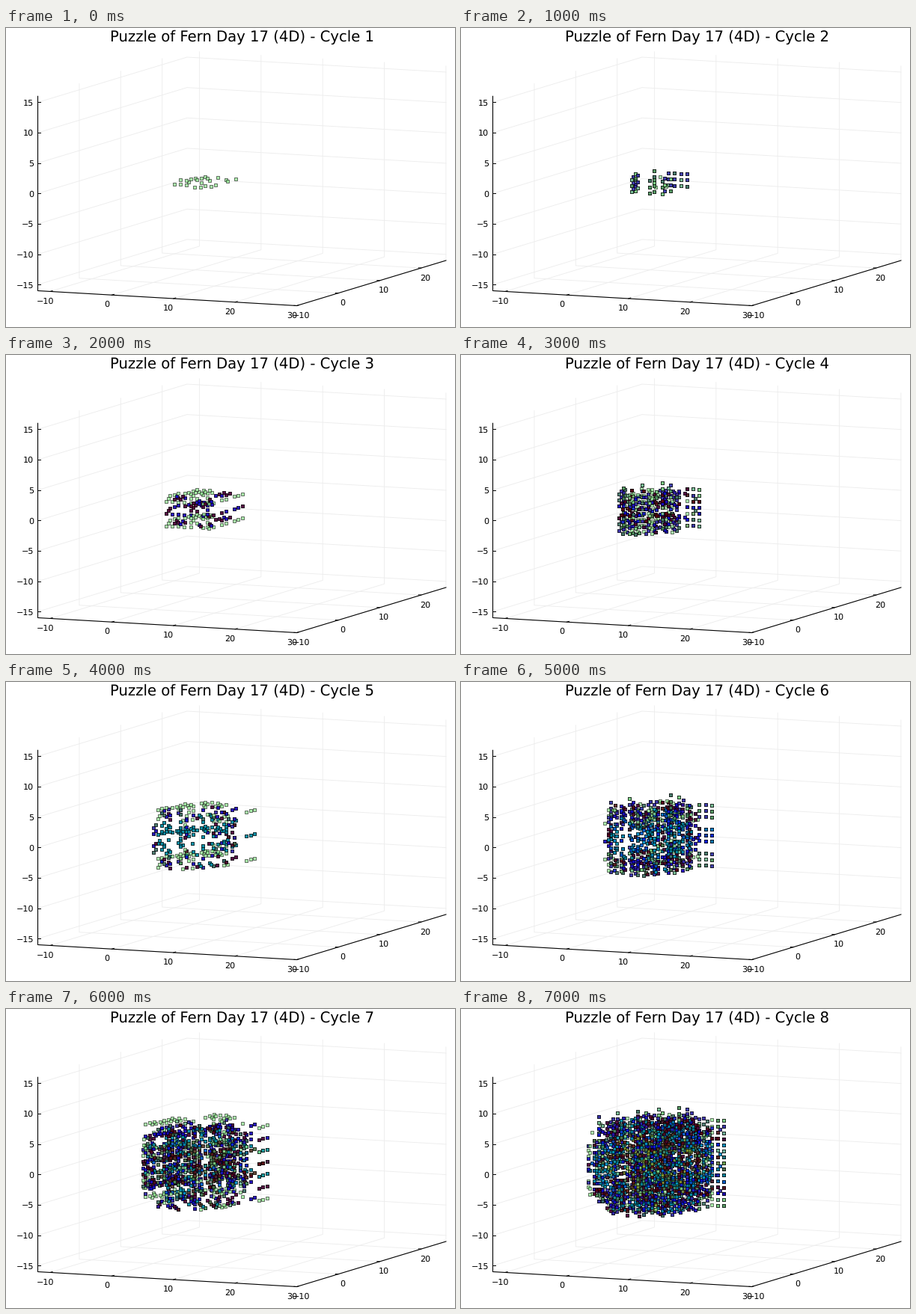
Write a matplotlib script that moves like this. It is 600 by 400 pixels and loops after 8000 ms.

```python
import numpy as np
import matplotlib.pyplot as plt
from matplotlib.animation import FuncAnimation

plt.rcParams["text.hinting"] = "none"

W, H, DPI = 600, 400, 100
PX = 72 / DPI  # points per pixel
FRAMES = 8
X0, X1, Y0, Y1, Z0, Z1 = -12, 30, -10, 26, -16, 16

# Live columns of each starting row, keyed by y
START = {1: (6, 7), 2: (2, 3, 4, 7, 8), 3: (8,), 4: (3, 5), 5: (1, 2),
         6: (2, 3, 5, 8), 7: (2, 3, 4, 7), 8: (3, 5, 8)}
OFFSET = np.array([7, 7, 8, 8])
SHAPE = (24, 24, 17, 17)

BLUE, VIOLET, AZURE = (8, 8, 235), (45, 15, 190), (0, 80, 215)
TEAL, CYAN = (0, 140, 165), (0, 155, 195)
MAROON, BROWN = (95, 0, 12), (95, 40, 35)
MINT, GREEN, OLIVE = (144, 238, 144), (75, 145, 85), (145, 175, 45)
# One colour for each fourth coordinate, -7 to 7
PALETTE = np.array([MAROON, GREEN, AZURE, TEAL, MAROON, BLUE, VIOLET, MINT,
                    GREEN, MAROON, BLUE, TEAL, CYAN, BROWN, OLIVE]) / 255
FILL_ALPHA = 0.75


def project(x, y, z):
    """Oblique view of the box, in stage pixels."""
    px = 42.5 + 8.238 * (x - X0) + 5.54 * (y - Y0)
    py = 351.5 + 0.476 * (x - X0) - 1.68 * (y - Y0) - 8.13 * (z - Z0)
    return px, py


def step(cells):
    total = cells.astype(int)
    for axis in range(4):
        total = total + np.roll(total, 1, axis) + np.roll(total, -1, axis)
    near = total - cells
    return (near == 3) | (cells & (near == 2))


def history():
    cells = np.zeros(SHAPE, bool)
    for y, row in START.items():
        for x in row:
            cells[tuple(OFFSET + (x, y, 0, 0))] = True
    states = [cells]
    while len(states) < FRAMES:
        states.append(step(states[-1]))
    return states


def markers(cells, seed):
    """Pixel positions and fills, stacked in a shuffled order."""
    points = np.argwhere(cells) - OFFSET
    points = np.random.default_rng(seed).permutation(points)
    x, y, z, w = points.T
    px, py = project(x, y, z)
    spots = np.column_stack([np.floor(px), np.round(py)]) + 0.5
    fills = np.column_stack([PALETTE[w + 7], np.full(len(w), FILL_ALPHA)])
    return spots, fills


fig = plt.figure(figsize=(W / DPI, H / DPI), dpi=DPI, facecolor="white")
ax = fig.add_axes([0, 0, 1, 1])
ax.set_xlim(0, W)
ax.set_ylim(H, 0)
ax.axis("off")


def path(*corners, color="#ededed", width=0.9, z=1):
    xs, ys = zip(*(project(*c) for c in corners))
    ax.plot(xs, ys, color=color, lw=width * PX, zorder=z)


def tick(point, dx, dy):
    px, py = project(*point)
    ax.plot([px, px + dx], [py, py + dy], color="black", lw=PX, zorder=3)
    return px, py


def label(x, y, value, align="center"):
    text = str(value).replace("-", "\u2212")
    ax.text(x, y + 4, text, ha=align, va="baseline",
            family="DejaVu Sans", size=11.1 * PX)


for x in range(-10, 31, 10):
    path((x, Y0, Z0), (x, Y1, Z0), (x, Y1, Z1))
    px, py = tick((x, Y0, Z0), 3, -0.9)
    label(px - 6.5, py + 12, x)
for y in range(-10, 21, 10):
    path((X1, y, Z0), (X0, y, Z0), (X0, y, Z1))
    px, py = tick((X1, y, Z0), -3.5, -0.2)
    label(px + 6, py + 12.3, y)
for z in range(-15, 16, 5):
    path((X0, Y0, z), (X0, Y1, z), (X1, Y1, z))
    px, py = tick((X0, Y0, z), 3, 0)
    label(px - 5.5, py, z, "right")
path((X0, Y0, Z1), (X0, Y0, Z0), (X1, Y0, Z0), (X1, Y1, Z0),
     color="black", width=1.1, z=2)

title = ax.text(315.5, 18, "", ha="center", va="baseline",
                family="DejaVu Sans", size=19.6 * PX)
dots = ax.scatter([], [], s=(4 * PX) ** 2, marker="s", linewidths=PX,
                  edgecolors=[(0, 0, 0, 0.55)], zorder=5)
scenes = [markers(cells, 17 + i) for i, cells in enumerate(history())]


def update(frame):
    spots, fills = scenes[frame]
    dots.set_offsets(spots)
    dots.set_facecolors(fills)
    title.set_text(f"Puzzle of Fern Day 17 (4D) - Cycle {frame + 1}")
    return dots, title


anim = FuncAnimation(fig, update, frames=FRAMES, interval=1000,
                     repeat=True, repeat_delay=0, blit=False)
plt.show()
```
